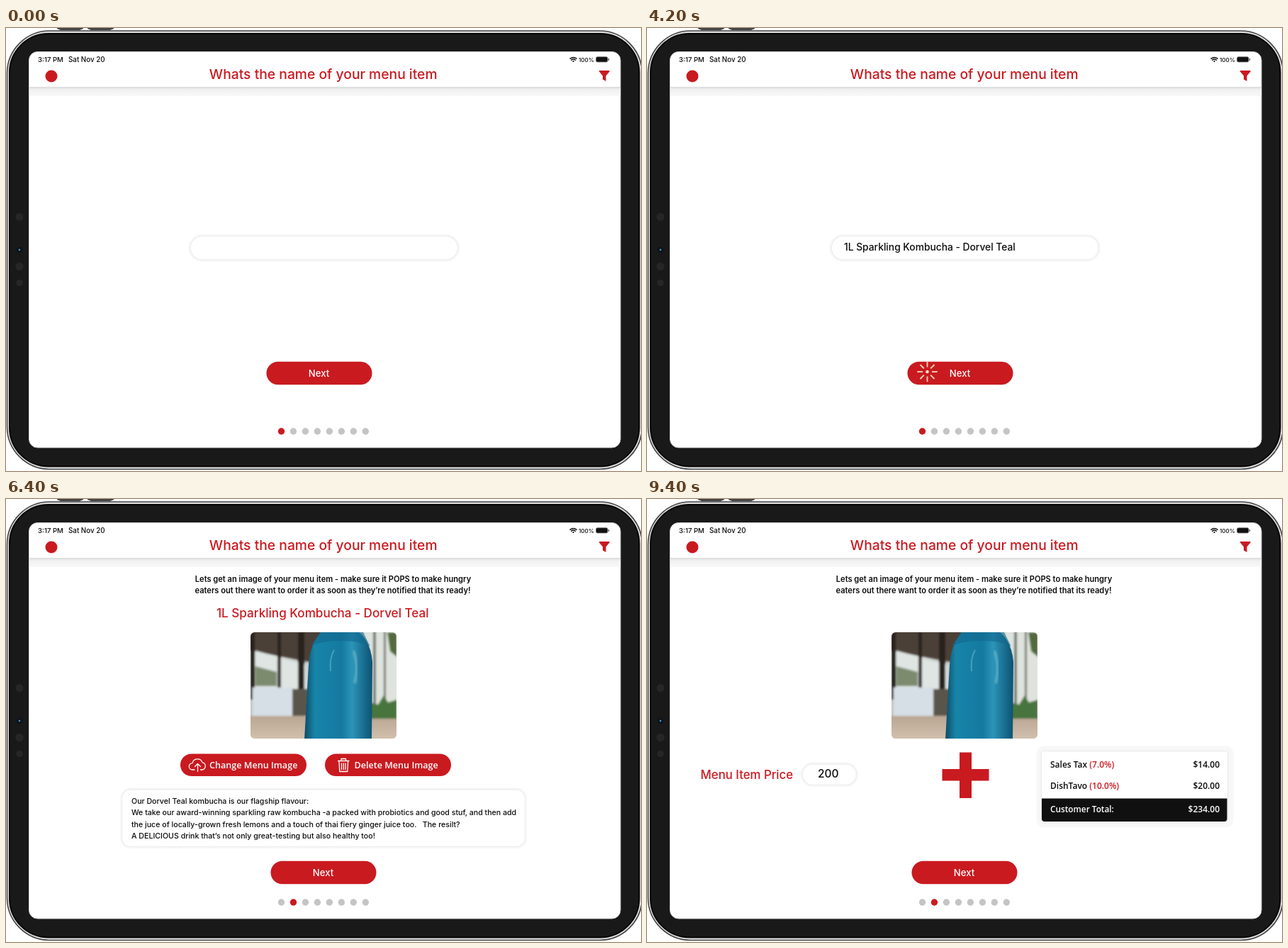
Animation of 896 by 625 pixels, one loop 9560 ms. Source, as an HTML page:

```html
<!DOCTYPE html>
<html lang="en">
<head>
<meta charset="utf-8">
<style>
html, body { margin: 0; width: 100%; height: 100%; overflow: hidden; background: #fff; }
svg { display: block; }
text { font: 500 13px Inter, sans-serif; white-space: pre; fill: #0c0c0c; }
.red, text .red { fill: #c91a20; }
.mid { text-anchor: middle; }
.end { text-anchor: end; }
.ui text { font: 600 12px "Open Sans", sans-serif; }
.white text, text.white { fill: #fff; }
.line { fill: none; stroke: #fff; stroke-width: 1.3; stroke-linecap: round; stroke-linejoin: round; }
.field { fill: #fff; stroke: #efefef; stroke-width: 1.5; filter: url(#soft); }
.ghost { fill: #858585; font-weight: 400; }
</style>
</head>
<body>
<svg width="896" height="625" viewBox="0 0 896 625">
  <defs>
    <filter id="soft" x="-10%" y="-30%" width="120%" height="160%">
      <feDropShadow dx="0" dy="0" stdDeviation="1.6" flood-opacity=".13"/>
    </filter>
    <filter id="blur"><feGaussianBlur stdDeviation="1.5"/></filter>
    <linearGradient id="shade" x2="0" y2="1">
      <stop stop-color="#d9d9d9"/><stop offset=".3" stop-color="#f1f1f1"/><stop offset="1" stop-color="#f9f9f9"/>
    </linearGradient>
    <linearGradient id="glass">
      <stop stop-color="#0d4a66"/><stop offset=".15" stop-color="#1784a8"/><stop offset=".55" stop-color="#1579a0"/>
      <stop offset=".7" stop-color="#2b94b8"/><stop offset="1" stop-color="#0c5273"/>
    </linearGradient>
    <linearGradient id="table" x2="0" y2="1">
      <stop stop-color="#b9a692"/><stop offset="1" stop-color="#d6c6b3"/>
    </linearGradient>
    <clipPath id="photoClip"><rect x="345" y="188" width="206" height="150" rx="6"/></clipPath>
  </defs>

  <!-- tablet -->
  <path d="M72 0h37v1l-5 2H77l-5-2zM115 0h37v1l-5 2h-27l-5-2z" fill="#444"/>
  <rect x="1.5" y="4" width="896" height="618.5" rx="60" fill="#dedede" stroke="#444" stroke-width="1.6"/>
  <rect x="5" y="8" width="888.5" height="610.5" rx="55" fill="#191919" stroke="#050505" stroke-width="2"/>
  <g fill="#262626">
    <circle cx="19" cy="266.5" r="5.5"/><circle cx="19" cy="336.5" r="5.8"/><circle cx="19" cy="359.5" r="4.8"/>
    <circle cx="19" cy="313" r="4" fill="#0b1219"/><circle cx="19" cy="313" r="1.4" fill="#3d8db5"/>
  </g>
  <rect x="32.5" y="33.5" width="834.5" height="558.5" rx="12" fill="#fff" stroke="#d5d5d5"/>
  <rect x="33" y="83" width="834" height="13" fill="url(#shade)"/>

  <!-- header -->
  <text x="45" y="48" style="font-size:9.6px">3:17 PM</text>
  <text x="88" y="48" style="font-size:9.8px">Sat Nov 20</text>
  <text x="808" y="47.5" style="font-size:8.1px">100%</text>
  <path d="M796 43.2q4.5-3.6 9 0M797.7 45.2q2.8-2.2 5.6 0" class="line" style="stroke:#111;stroke-width:1.5"/>
  <circle cx="800.5" cy="47" r="1.1"/>
  <rect x="832.5" y="40.7" width="16.5" height="7.3" rx="2" fill="#111" stroke="#777" stroke-width=".8"/>
  <path d="M850.5 43v3" stroke="#555" stroke-width="1.2"/>
  <circle class="red" cx="64" cy="68" r="8.5"/>
  <text class="red mid" x="447.7" y="71.5" style="font-size:19.3px">Whats the name of your menu item</text>
  <path class="red" d="M837 60h14.500v1.500l-5 6v7.500l-4.500-2.500v-5l-5-6z"/>

  <g id="name">
    <rect class="field" x="260" y="293.5" width="377.5" height="33.5" rx="16.75"/>
    <text id="nameText" style="font-size:13.8px"></text>
  </g>

  <g id="photo">
    <text class="mid" x="461.5" y="116.8" style="font-size:11.1px;font-weight:600">Lets get an image of your menu item - make sure it POPS to make hungry</text>
    <text class="mid" x="461" y="133" style="font-size:11.1px;font-weight:600">eaters out there want to order it as soon as they’re notified that its ready!</text>
    <g clip-path="url(#photoClip)">
      <rect x="345" y="188" width="206" height="150" fill="#c3c8c5"/>
      <g filter="url(#blur)">
        <path d="M340 183h105v50l-105-20z" fill="#4b4038"/>
        <path d="M352 214l72 20v38h-72z" fill="#dfe5e3"/>
        <path d="M352 236l30 8v20h-30z" fill="#7c8b6e"/>
        <path d="M383 188h5v85h-5zM345 188h6v95h-6zM412 188h9v118h-9z" fill="#25241f"/>
        <path d="M388 268h40v40h-40z" fill="#5a544b"/>
        <path d="M348 266h56v42h-56z" fill="#d5dfe5"/>
        <path d="M340 306h220v40H340z" fill="url(#table)"/>
        <path d="M505 183h50v125h-50z" fill="#dfe3dd"/>
        <path d="M518 183h4v118h-4zM533 183h3v105h-3z" fill="#70756c"/>
        <path d="M538 188h14v35l-10-8z" fill="#526b3d"/>
        <path d="M513 287l12 3 8-13 6 10 13-4v27h-39z" fill="#47753c"/>
      </g>
      <path d="M421 340l6-106q2-30 18-46h53q17 14 19 42l-1 110z" fill="url(#glass)"/>
      <path d="M430 208q14-8 42-8t42 8l-10-20h-61z" fill="#12688e" opacity=".6"/>
      <path d="M490 214q8 20 2 46" fill="none" stroke="#8fd0de" stroke-width="4" opacity=".5" filter="url(#blur)"/>
      <path d="M463 213q-7 12-5 30" fill="none" stroke="#76c0d5" stroke-width="2" opacity=".5"/>
    </g>
  </g>

  <g id="details">
    <text class="red" x="297" y="167" style="font-size:17.1px">1L Sparkling Kombucha - Dorvel Teal</text>
    <g class="ui white">
      <rect class="red" x="246" y="359.5" width="178" height="31.5" rx="15.75"/>
      <rect class="red" x="450" y="359.5" width="178" height="31.5" rx="15.75"/>
      <text x="287" y="380" style="font-size:12.6px">Change Menu Image</text>
      <text x="491.5" y="380" style="font-size:12.6px">Delete Menu Image</text>
    </g>
    <path class="line" d="M266 382h-3a4.700 4.700 0 0 1 0-9.400 7.300 7.300 0 0 1 14-1 5.300 5.300 0 0 1 0 10.400h-2.500M270.500 384.500v-11m-4 4l4-4 4 4"/>
    <path class="line" d="M468.500 369.500h15.500M473 369v-2.500h6.500v2.500M470 370l.8 14.500h11l.8-14.500M473.500 373v8.500M476.300 373v8.500M479 373v8.500"/>
    <rect class="field" x="163.5" y="410" width="569" height="80.5" rx="12"/>
    <text id="detailText" style="font-size:10.62px"></text>
  </g>

  <g id="price">
    <text class="red" x="75.5" y="395" style="font-size:16.8px">Menu Item Price</text>
    <rect class="field" x="219" y="374" width="76.5" height="29.5" rx="14.75"/>
    <text id="priceText" style="font-size:15.5px"></text>
    <path class="red" d="M441 357.500h17V381h24.500v16.500H458V422h-17v-24.500h-24.500V381H441z"/>
    <rect x="549.5" y="348.5" width="278" height="115" rx="11" fill="#f7f7f7"/>
    <rect x="557" y="356.5" width="262" height="98.5" rx="4" fill="#fff" filter="url(#soft)"/>
    <path d="M557 422.500h261.500V451q0 4-4 4H561q-4 0-4-4z" fill="#101010"/>
    <g class="ui">
      <text x="569" y="378.5">Sales Tax <tspan class="red">(7.0%)</tspan></text>
      <text x="569" y="408.5">DishTavo <tspan class="red">(10.0%)</tspan></text>
      <text class="white" x="569" y="441.5" style="font-size:11.8px">Customer Total:</text>
      <text class="end" x="808" y="378.5">$14.00</text>
      <text class="end" x="808" y="408.5">$20.00</text>
      <text class="end white" x="808" y="441.5">$234.00</text>
    </g>
  </g>

  <g id="next">
    <rect class="red" x="367.5" y="470.7" width="149" height="32.6" rx="16.3"/>
    <text class="white mid" x="441.5" y="491.7" style="font-size:13.1px">Next</text>
  </g>
  <g id="dots"></g>
  <g id="tap" stroke="#ecd5b5" stroke-width="1.9"><circle r="2.3" fill="#f6e4c9" stroke="none"/></g>
</svg>

<script>
const LOOP = 9560, FRAME = 40, SVG = "http://www.w3.org/2000/svg";
const $ = id => document.getElementById(id);

function add(parent, tag, attrs) {
  const el = document.createElementNS(SVG, tag);
  for (const key in attrs) el.setAttribute(key, attrs[key]);
  return parent.appendChild(el);
}

const show = (id, on) => $(id).style.display = on ? "" : "none";

// Reveals the lines letter by letter; the newest letter is a grey random one.
function typewriter(id, x, y, start, end, lines) {
  const total = lines.join("").length;
  const rows = lines.map((line, i) => ({
    line,
    done: add($(id), "tspan", { x, y: y + i * 16.5 }),
    ghost: add($(id), "tspan", { class: "ghost" })
  }));
  return t => {
    const progress = Math.min(1, (t - start) / (end - start));
    const step = Math.round((t - start) / FRAME);
    const letter = String.fromCharCode(97 + (step * 9 + 24) % 26);
    let left = Math.floor(progress * total);
    for (const { line, done, ghost } of rows) {
      done.textContent = line.slice(0, Math.max(0, left));
      ghost.textContent = t >= start && left >= 0 && left < line.length ? letter : "";
      left -= line.length;
    }
  };
}

const typers = [
  typewriter("nameText", 278, 314.3, 1400, 3400, ["1L Sparkling Kombucha - Dorvel Teal"]),
  typewriter("detailText", 177, 429.6, 4360, 6400, [
    "Our Dorvel Teal kombucha is our flagship flavour:",
    "We take our award-winning sparkling raw kombucha -a packed with probiotics and good stuf, and then add",
    "the juce of locally-grown fresh lemons and a touch of thai fiery ginger juice too.   The resilt?",
    "A DELICIOUS drink that’s not only great-testing but also healthy too!"
  ]),
  typewriter("priceText", 241, 393.3, 7440, 9400, ["200"])
];

const taps = [[1320, 277.5, 316.5], [4200, 395.5, 485], [7280, 401.5, 525]];

const dots = Array.from({ length: 8 }, (_, i) =>
  add($("dots"), "circle", { cx: 388.5 + i * 16.97, cy: 569, r: 4.7 }));
for (let a = 0; a < 360; a += 45)
  add($("tap"), "path", { d: "M6.5 0H14.2", transform: `rotate(${a})` });

function draw(now) {
  const t = Math.floor(now % LOOP / FRAME) * FRAME;
  const screen = t < 4280 ? 0 : t < 7360 ? 1 : 2;
  ["name", "details", "price"].forEach((id, i) => show(id, i === screen));
  show("photo", screen > 0);
  $("next").setAttribute("transform", screen ? "translate(6 40)" : "");
  dots.forEach((dot, i) => dot.setAttribute("fill", i === Math.min(screen, 1) ? "#c91a20" : "#c4c4c4"));
  typers[screen](t);
  const tap = taps.find(([start]) => t >= start && t < start + 80);
  show("tap", tap);
  if (tap) $("tap").setAttribute("transform", `translate(${tap[1]} ${tap[2]})`);
  requestAnimationFrame(() => draw(performance.now()));
}
draw(0);
</script>
</body>
</html>
```
